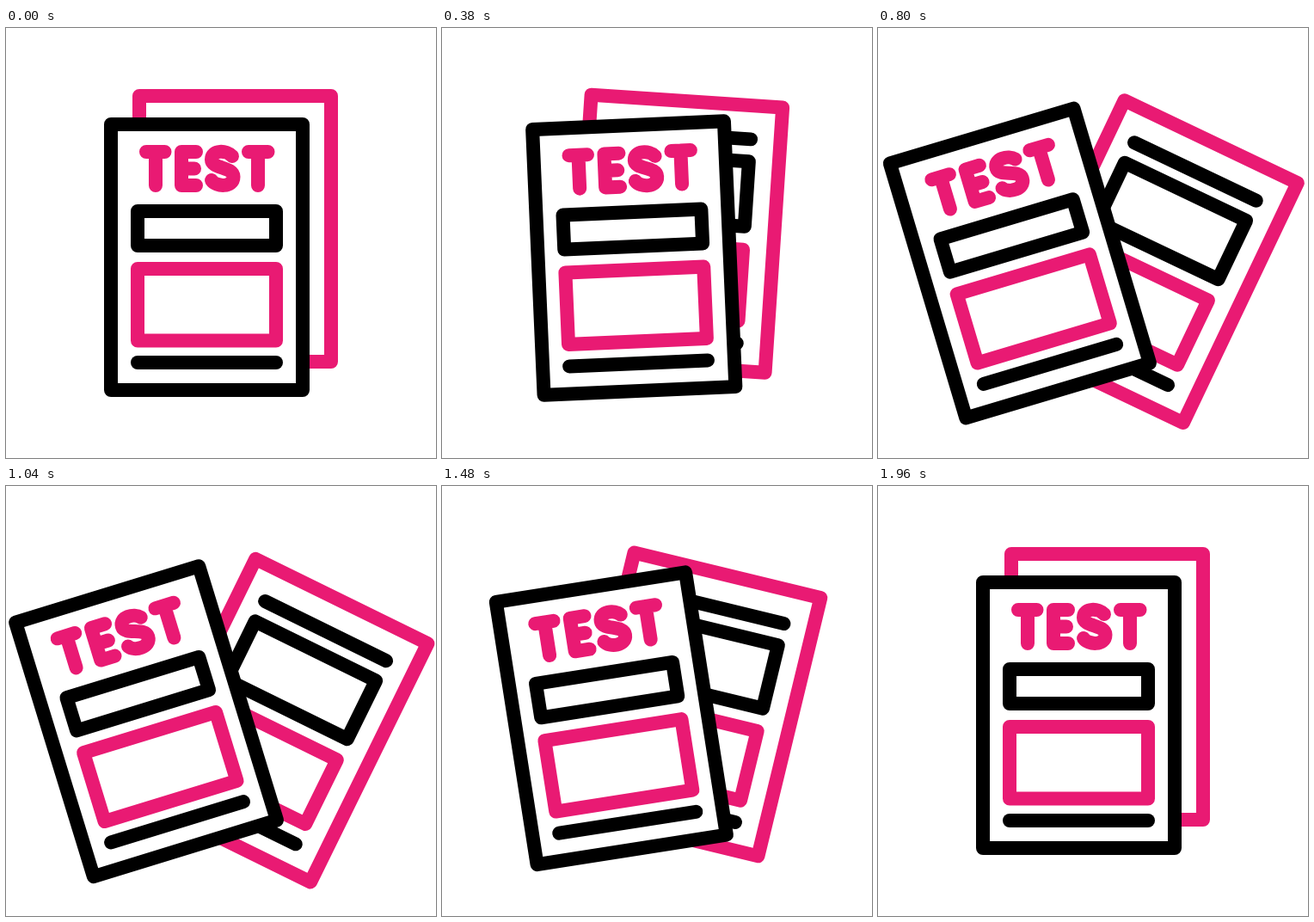
These frames come from a looping animation (500x500 px, 2 s). An HTML page:

```html
<!DOCTYPE html>
<html lang="en">
<head>
<meta charset="utf-8">
<title>Test sheets</title>
<style>
  html, body { margin: 0; width: 100%; height: 100%; overflow: hidden; background: #fff; }
  svg { display: block; width: 100vw; height: 100vh; }
  g { fill: none; stroke-width: 16; stroke-linecap: round; stroke-linejoin: round; }
  .ink { stroke: #000; }
  .pink { stroke: #e91a73; }
  .paper { fill: #fff; }
</style>
</head>
<body>
<svg viewBox="0 0 500 500">
  <!-- Each sheet is drawn around its own centre. -->
  <g id="back">
    <rect class="pink paper" x="-111.5" y="-154.5" width="223" height="309"/>
    <path class="ink" d="M-80 -115.2H77"/>
    <rect class="ink" x="-80" y="-89.2" width="156.5" height="75.6"/>
    <rect class="pink" x="-80" y="13.5" width="156.5" height="83"/>
    <path class="ink" d="M-80 122.5H76.5"/>
  </g>
  <g id="front">
    <rect class="ink paper" x="-111.5" y="-154.5" width="223" height="309"/>
    <g class="pink" role="img" aria-label="TEST" transform="translate(-233.5 -266.5)">
      <path d="M163 144H184.5M174 144V183"/>
      <path d="M221 144H204V183H221M204 163.5H219"/>
      <path d="M263 149C257 142 239 141 239 153C239 164 264.5 161 264.5 173C264.5 186 244 185 239 177"/>
      <path d="M282 144H304.5M293 144V183"/>
    </g>
    <rect class="ink" x="-80.5" y="-53.5" width="161" height="40"/>
    <rect class="pink" x="-80.5" y="13.5" width="161" height="83.5"/>
    <path class="ink" d="M-80.5 122.5H80.5"/>
  </g>
</svg>
<script>
  const LOOP = 2000, STEP = 20, OPEN = 1000, CLOSED = 1960;

  // Resting centre, travel and turn of each sheet when fully fanned out.
  const sheets = [
    { node: document.getElementById("back"), x: 266.5, y: 233.5, dx: 55.7, dy: 39.2, turn: 26.2 },
    { node: document.getElementById("front"), x: 233.5, y: 266.5, dx: -70.5, dy: 7.2, turn: -17.1 }
  ];

  // Cubic Bezier easing (.82, 0, .19, 1), solved by bisection.
  function ease(x) {
    if (x <= 0) return 0;
    if (x >= 1) return 1;
    let low = 0, high = 1, s = 0.5;
    for (let i = 0; i < 30; i++) {
      s = (low + high) / 2;
      const r = 1 - s;
      if (3 * r * r * s * 0.82 + 3 * r * s * s * 0.19 + s ** 3 < x) low = s;
      else high = s;
    }
    return s * s * (3 - 2 * s);
  }

  function draw(time) {
    const t = Math.floor((time % LOOP) / STEP) * STEP;
    const p = t < OPEN ? ease(t / OPEN) : 1 - ease((t - OPEN) / (CLOSED - OPEN));
    for (const { node, x, y, dx, dy, turn } of sheets) {
      node.setAttribute("transform", `translate(${x + dx * p} ${y + dy * p}) rotate(${turn * p})`);
    }
  }

  const start = performance.now();
  function tick() {
    draw(performance.now() - start);
    requestAnimationFrame(tick);
  }
  tick();
</script>
</body>
</html>
```
